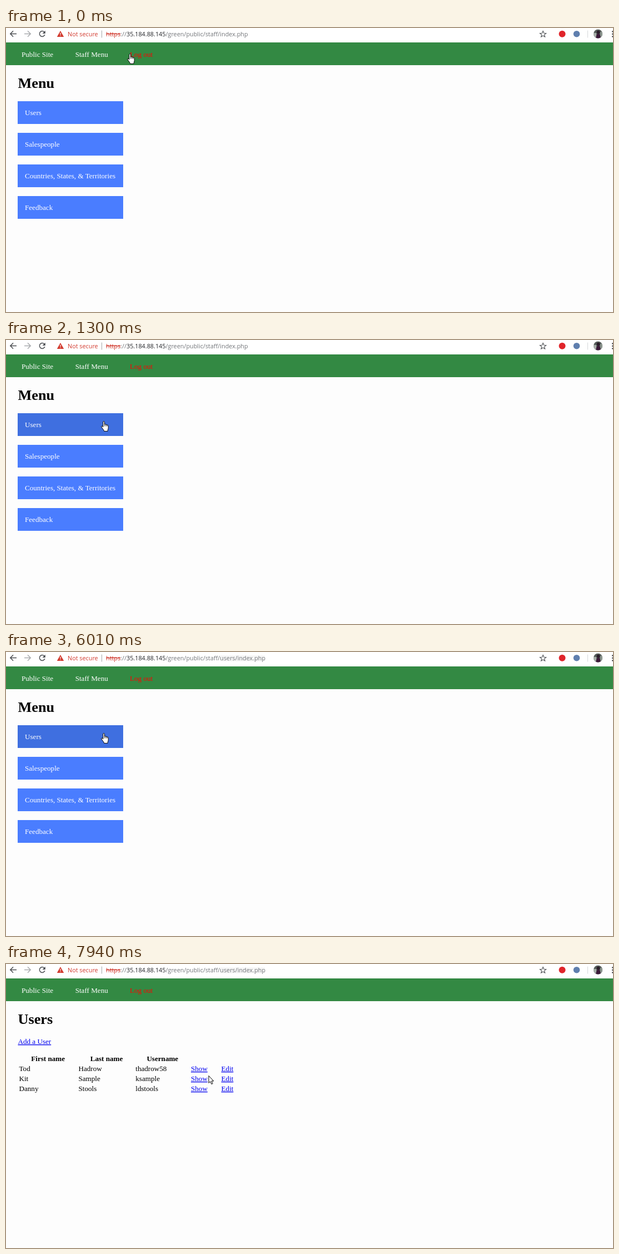
Animation, 1093 px wide and 512 px high, one loop 8000 ms. Source, as an HTML page:

```html
<!DOCTYPE html>
<html lang="en">
<head>
<meta charset="utf-8">
<title>Staff menu</title>
<style>
  html, body { margin: 0; width: 100%; height: 100%; overflow: hidden; background: #fdfdfd; }
  svg { display: block; }
  text { font: 13.12px "Liberation Serif", "Times New Roman", serif; white-space: pre; }
  .bar text { font: 10.83px "Open Sans", "Noto Sans", sans-serif; }
  .title { font-size: 26.24px; font-weight: bold; }
  .head { font-weight: bold; }
  .link { fill: #0000ee; text-decoration: underline; }
  .icon { fill: none; stroke: #4b4e52; stroke-width: 1.5; }
  .cursor { fill: #fff; stroke: #000; stroke-linejoin: round; }
</style>
</head>
<body>
<svg width="1093" height="512" viewBox="0 0 1093 512">
  <defs>
    <clipPath id="face"><circle cx="1066" cy="10.5" r="8"/></clipPath>
  </defs>
  <rect width="1093" height="512" fill="#fdfdfd"/>

  <g class="bar">
    <rect width="1093" height="26" fill="#fff"/>
    <path class="icon" d="M19 10.5H8M13 5.3L7.8 10.5L13 15.7"/>
    <path class="icon" style="stroke:#a9abae" d="M33 10.5H44M39 5.3L44.2 10.5L39 15.7"/>
    <g id="reload">
      <path class="icon" d="M68.9 7.2A4.9 4.9 0 1 0 69.9 12"/>
      <path d="M70.8 4.8V10H65.6Z" fill="#4b4e52"/>
    </g>
    <path id="stop" class="icon" d="M60.5 6L69.5 15M69.5 6L60.5 15"/>
    <path d="M98 5L104.2 16H91.8Z" fill="#d23a2e"/>
    <path d="M98 8.6V12.2M98 13.2V14.6" stroke="#fff" stroke-width="1.2"/>
    <text x="111" y="14.8" fill="#d23a2e">Not secure</text>
    <path d="M172.5 4.5V17.5" stroke="#a5a7aa"/>
    <rect id="shade" x="386" y="6" width="80" height="11" fill="#f6f6f6"/>
    <text x="180" y="14.8" fill="#73767a"><tspan fill="#cf3529" text-decoration="line-through">https</tspan>://<tspan fill="#222428">35.184.88.145</tspan>/green/public/staff/<tspan id="path"></tspan></text>
    <path class="icon" style="stroke-width:1.1" d="M967 5.4L968.6 9.2L972.6 9.5L969.5 12.1L970.5 16L967 13.9L963.5 16L964.5 12.1L961.4 9.5L965.4 9.2Z"/>
    <circle cx="1001.5" cy="10.7" r="6" fill="#e0242a"/>
    <circle cx="1027.5" cy="10.7" r="5.8" fill="#5f7fae"/>
    <path d="M1047.5 4.5V17.5" stroke="#d6d8da"/>
    <g clip-path="url(#face)">
      <rect x="1058" y="2" width="16" height="17" fill="#565d5a"/>
      <rect x="1058" y="9" width="5" height="10" fill="#a6aea8"/>
      <rect x="1070" y="7" width="5" height="12" fill="#8c968f"/>
      <circle cx="1066.5" cy="7.5" r="3" fill="#2a1d29"/>
      <path d="M1062 19Q1063 10 1066.5 10T1071 19Z" fill="#3b1938"/>
    </g>
    <g fill="#4b4e52"><circle cx="1092.3" cy="6.4" r="1.3"/><circle cx="1092.3" cy="10.9" r="1.3"/><circle cx="1092.3" cy="15.4" r="1.3"/></g>
  </g>

  <rect y="26" width="1093" height="41" fill="#338943"/>
  <g fill="#fff">
    <text x="28" y="51.5">Public Site</text>
    <text x="124.7" y="51.5">Staff Menu</text>
    <text x="223" y="51.5" fill="#f00">Log out</text>
  </g>

  <g id="menu"><text class="title" x="21.5" y="108">Menu</text></g>
  <g id="users"><text class="title" x="21.5" y="108">Users</text></g>

  <g id="hand" class="cursor">
    <path d="M3.8 1.8C3.8 .2 6.4 .2 6.4 1.8V6.3C6.6 5.3 8.7 5.4 8.8 6.9C9 6 11 6.2 11 7.6C11.2 6.8 13.2 7.2 13.2 8.8V12.5C13.2 14.5 12.2 15.5 12 18.4H5.6C5.2 16 2.6 13.5 1 11C0 9.3 1.8 8.5 3 9.8L3.8 10.8Z"/>
    <path d="M6.4 6.3V9.5M8.8 6.9V9.5M11 7.6V9.8" stroke-width=".8"/>
  </g>
  <path id="arrow" class="cursor" d="M.5 .5V13.5L3.4 10.8L5.5 15.6L7.6 14.7L5.6 10H9.4Z"/>
  <path id="beam" fill="none" stroke="#222" d="M0 .5H2.2L3 1.2L3.8 .5H6M3 1V12M0 12.5H2.2L3 11.8L3.8 12.5H6"/>
</svg>

<script>
const $ = id => document.getElementById(id);

function add(parent, tag, attrs, text = '') {
  const el = document.createElementNS('http://www.w3.org/2000/svg', tag);
  for (const key in attrs) el.setAttribute(key, attrs[key]);
  el.textContent = text;
  parent.append(el);
  return el;
}

const buttons = ['Users', 'Salespeople', 'Countries, States, & Territories', 'Feedback'].map((label, i) => {
  const y = 132 + i * 57;
  const box = add($('menu'), 'rect', { x: 21, y, width: 190, height: 41, fill: '#4a7dff' });
  add($('menu'), 'text', { x: 34, y: y + 25, fill: '#fff' }, label);
  return box;
});

const cell = (x, y, text, cls = '') => add($('users'), 'text', { x, y, class: cls }, text);
cell(21.5, 144, 'Add a User', 'link');
cell(45.3, 175, 'First name', 'head');
cell(151.7, 175, 'Last name', 'head');
cell(253.4, 175, 'Username', 'head');
[
  ['Tod', 'Hadrow', 'thadrow58'],
  ['Kit', 'Sample', 'ksample'],
  ['Danny', 'Stools', 'ldstools']
].forEach(([first, last, login], i) => {
  const y = 193 + i * 18;
  cell(23.5, y, first);
  cell(130.5, y, last);
  cell(233.3, y, login);
  cell(333, y, 'Show', 'link');
  cell(387.6, y, 'Edit', 'link');
});

// start time, cursor shape, left, top
const moves = [
  [0, 'hand', 218, 46], [160, 'hand', 227, 46], [310, 'hand', 240, 47], [460, 'hand', 243, 48],
  [580, 'arrow', 184, 107], [730, 'arrow', 181, 109],
  [890, 'hand', 174, 140], [1030, 'hand', 172, 143], [1160, 'hand', 171, 145], [1300, 'hand', 171, 146],
  [6700, 'arrow', 212, 153], [6820, 'beam', 266, 163], [6970, 'beam', 285, 179], [7240, 'beam', 286, 181],
  [7380, 'arrow', 307, 195], [7530, 'arrow', 318, 197], [7790, 'arrow', 347, 197], [7940, 'arrow', 364.5, 201]
];

const show = (id, on) => $(id).setAttribute('visibility', on ? 'visible' : 'hidden');

function draw(t) {
  const [, shape, x, y] = moves.findLast(m => m[0] <= t);
  for (const id of ['hand', 'arrow', 'beam']) show(id, id === shape);
  $(shape).setAttribute('transform', `translate(${x} ${y})`);

  const loading = t >= 2440 && t < 6010;
  show('stop', loading);
  show('reload', !loading);

  const moved = t >= 5010;
  show('shade', moved);
  $('path').textContent = moved ? 'users/index.php' : 'index.php';

  show('menu', t < 6130);
  show('users', t >= 6130);
  buttons[0].setAttribute('fill', t >= 890 ? '#3f6fe0' : '#4a7dff');
}

const start = performance.now();
function tick() {
  draw((performance.now() - start) % 8000);
  requestAnimationFrame(tick);
}
tick();
</script>
</body>
</html>
```
